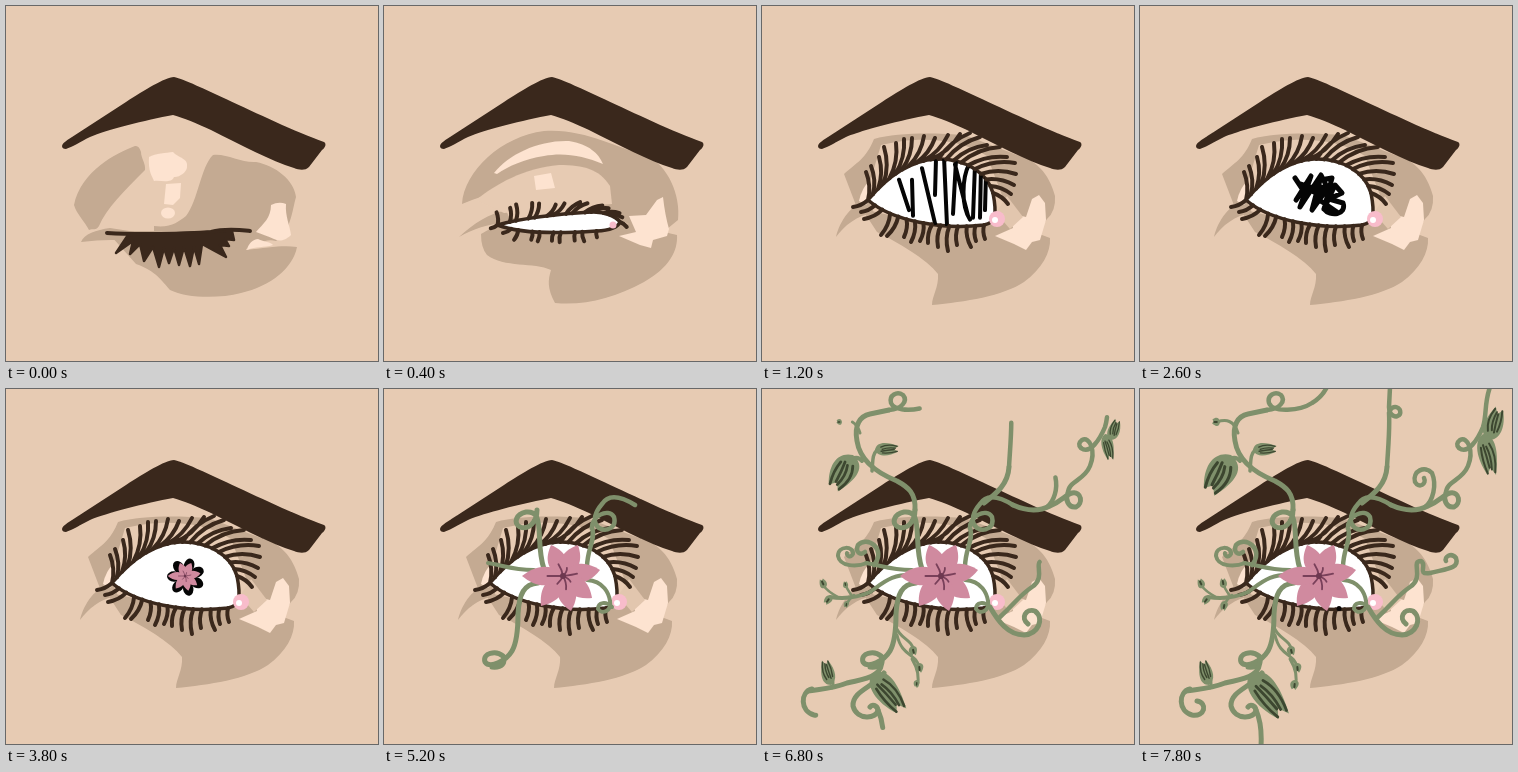
Recreate the animation shown at these times as an HTML page. Size 372x355 px, loop 8000 ms.

```html
<!DOCTYPE html>
<html lang="en">
<head>
<meta charset="utf-8">
<title>Blooming eye</title>
<style>
html, body { margin: 0; width: 100%; height: 100%; overflow: hidden; background: #e7cbb3; }
svg { display: block; width: 100%; height: 100%; }
.shade { fill: #c4aa92; }
.light { fill: #fde3d0; }
.skin { fill: #e7cbb3; }
.brown { fill: #3a281c; }
.line { fill: none; stroke: #3a281c; stroke-linecap: round; stroke-linejoin: round; }
.ink { fill: none; stroke: #050505; stroke-linecap: round; stroke-linejoin: round; }
.vine { fill: none; stroke: #7f906b; stroke-linecap: round; stroke-linejoin: round; }
</style>
</head>
<body>
<svg viewBox="0 0 372 355" id="stage">
  <defs><clipPath id="inside"><path id="clip"/></clipPath></defs>
  <rect class="skin" width="372" height="355"/>

  <g id="shutShade">
    <g class="shade">
      <path d="M129 140C110 147 75 165 68 199C70 207 79 216 83 224C87 222 90 225 93 220C100 203 118 185 139 164C140 158 135 152 135 146Q133 139 129 140Z"/>
      <path d="M75 236C78 228 90 224 104 222L130 226V236C110 233 95 234 75 236Z"/>
      <path d="M105 230L130 258C150 265 156 275 164 284C180 292 212 293 235 287C265 280 287 262 291 241C275 239 262 242 240 244V225H100Z"/>
      <path d="M207 149C220 147 235 157 250 156C270 160 288 174 290 191C286 205 285 225 270 235C258 232 250 240 240 243L148 230V220C165 222 172 216 180 210C192 195 195 160 207 149Z"/>
    </g>
    <g class="light">
      <path d="M143 151C150 147 160 147 167 146C172 152 182 152 181 160C182 166 172 172 168 171C165 178 155 174 148 175C146 170 142 165 143 151Z"/>
      <path d="M160 178L175 177L174 192L167 199L158 198Z"/>
      <ellipse cx="162" cy="207" rx="7" ry="5.5"/>
      <path d="M265 199Q273 195 280 198C279 210 284 220 285 229C278 236 272 235 268 233C262 230 255 228 250 226C257 218 265 212 265 199Z"/>
      <path d="M241 244C242 238 247 233 252 233C258 236 265 236 267 239C258 242 250 240 241 244Z"/>
    </g>
  </g>

  <g id="halfShade">
    <g class="shade">
      <path d="M78 198C80 165 118 130 160 125C200 122 232 142 262 149C284 159 297 190 294 214L272 232L225 208L215 190C170 176 125 178 78 198Z"/>
      <path d="M75 231C90 217 105 208 122 204L128 218C108 216 92 222 75 231Z"/>
      <path d="M97 228L125 212L232 215L293 229C294 245 285 262 260 276C230 292 200 300 171 297C163 282 164 274 167 264C150 256 120 262 103 249Q97 242 97 228Z"/>
    </g>
    <path class="skin" d="M92 194C112 178 140 162 175 159C200 159 215 163 226 180L228 198L120 207Z"/>
    <path class="light" d="M110 167C125 148 155 134 185 135C205 138 215 148 219 158C200 150 180 146 160 150C140 153 125 160 113 168Z"/>
    <path class="light" d="M150 170L167 167L171 182L152 184Z"/>
    <path class="light" d="M273 194L279 191Q281 209 285 223L283 230L269 234L267 242L256 239L235 230L252 226L245 210L262 209Z"/>
  </g>

  <g id="openShade">
    <g class="shade">
      <path d="M82 168C94 157 104 153 112 133C135 126 175 127 203 129L255 149C273 153 287 167 293 190Q294 205 285 213L272 232L246 205L225 150C195 130 150 131 119 139L107 179L95 202Z"/>
      <path d="M74 231C78 214 90 198 106 193L112 207C95 209 82 220 74 231Z"/>
      <path d="M100 203L115 226C135 236 165 253 176 268C177 281 170 290 170 299C203 296 241 290 262 276C280 263 289 246 288 232L280 229L232 212L150 214Z"/>
    </g>
    <path class="light" d="M97 195Q100 181 108 175L112 187L104 199Z"/>
    <path class="light" d="M270 193L277 189L283 197L284 214L278 234L270 236L264 244L252 238L233 230L251 222L247 207L264 211Z"/>
    <path d="M245 190L261 211L248 223L234 207Z" fill="#e2c6ae"/>
  </g>

  <path class="brown" d="M56 140C57 136 62 134 66 131L120 96C140 83 158 72 168 71C178 73 200 84 220 93C250 107 290 126 318 136C321 138 319 142 316 144L303 161C299 165 293 164 288 162C265 155 235 139 205 124C190 117 178 112 167 109C140 114 100 124 84 131C74 136 66 141 60 143Q56 143 56 140Z"/>

  <g id="shutLash">
    <path class="line" stroke-width="4" d="M101 227C130 229 180 228 205 226C220 222 235 224 244 225"/>
    <path class="line" style="fill:#3a281c" stroke-width="2.5" d="M122 229L110 247L127 235L124 248L134 238L138 255L147 241L153 261L158 242L163 257L168 242L173 259L178 241L184 260L188 241L193 258L196 238L207 244L220 251L214 239L223 240L219 233L228 234L226 225L205 226Z"/>
  </g>

  <g id="eye">
    <path id="white" class="line" style="fill:#fff" stroke-width="3.5"/>
    <g clip-path="url(#inside)">
      <path id="bars" class="ink" stroke-width="4" vector-effect="non-scaling-stroke"
        d="M137 198L147 214M150 198L151 217M160 192L173 221M174 187L173 206M182 186L185 222M194 188L191 216M193 190L206 217M207 190C200 197 199 212 208 219M213 190L211 218M219 191L218 218M224 195L223 214"/>
    </g>
    <path id="scrawl" class="ink" stroke-width="5"
      d="M155 172L163 184L156 194L171 170L160 201L181 169L187 181L166 182L182 190L172 204L180 174L192 172L184 203L195 179L202 187L189 193L203 197C207 209 190 211 184 203L197 206L178 193L186 186L160 178"/>
    <circle id="duct" fill="#f8bccb"/>
    <circle id="glint" cx="233" cy="214" r="3" fill="#fff"/>
    <path id="lashes" class="line" stroke-width="4"/>
  </g>

  <g id="vines"></g>
  <g id="petals"></g>
  <circle id="speck" cx="199" cy="219.500" r="2.500" fill="#080505"/>
</svg>
<script>
const STEP = 200, STEPS = 40;
const $ = id => document.getElementById(id);
const clamp = v => Math.max(0, Math.min(1, v));
const show = (el, on) => el.setAttribute('display', on ? 'inline' : 'none');
const set = (el, attrs) => { for (const n in attrs) el.setAttribute(n, attrs[n]); return el; };
const add = (parent, tag, attrs) =>
  parent.appendChild(set(document.createElementNS('http://www.w3.org/2000/svg', tag), attrs));

// Eyelid outlines: corner, upper lid (two curves), inner corner, lower lid
const SHUT = [106,228, 130,229, 180,229, 215,225, 225,224, 235,225, 240,225, 235,226, 225,227, 215,227, 180,229, 130,230, 106,228];
const HALF = [121,210, 140,197, 168,186, 200,187, 218,187, 229,196, 232,207, 232,218, 224,222, 210,223, 175,226, 140,225, 121,210];
const OPEN = [106,194, 120,177, 142,155, 174,153, 202,152, 225,166, 231,187, 235,208, 234,217, 222,219, 180,224, 130,215, 106,194];
const OPENING = [0, .25, .5, .75, 1, 1.5, 2];
const TOP_TIPS = [104,166, 109,160, 117,151, 122,141, 134,137, 142,133, 150,132, 162,130, 173,132, 186,129, 198,128,
  208,127, 218,131, 225,139, 238,141, 245,151, 253,157, 254,168, 252,179, 249,188, 246,198];
const LOW_TIPS = [91,201, 99,206, 102,213, 119,229, 125,230, 142,231, 149,236, 158,235, 166,237, 176,241, 186,245,
  195,239, 209,241, 214,235, 223,233];

const curve = (e, ...ids) => {
  const p = i => e[2 * i] + ' ' + e[2 * i + 1];
  return 'M' + p(ids[0]) + 'C' + ids.slice(1).map(p).join(' ');
};
const upper = e => curve(e, 0, 1, 2, 3, 4, 5, 6);
const lower = e => curve(e, 12, 11, 10, 9);
const ruler = document.createElementNS('http://www.w3.org/2000/svg', 'path');

function roots(d, n) {
  ruler.setAttribute('d', d);
  const len = ruler.getTotalLength();
  return Array.from({ length: n }, (_, i) => ruler.getPointAtLength(len * i / (n - 1)));
}

const rows = [[upper, TOP_TIPS, 1], [lower, LOW_TIPS, -1]].map(([lid, tips, bend]) => {
  const n = tips.length / 2;
  const dirs = roots(lid(OPEN), n).map((p, i) => [tips[2 * i] - p.x, tips[2 * i + 1] - p.y]);
  return { lid, dirs, n, bend };
});

function lashPath(e, size, sparse) {
  let d = '';
  for (const { lid, dirs, n, bend } of rows) {
    roots(lid(e), n).forEach((p, i) => {
      if (sparse && i % 3 === 1) return;
      const x = dirs[i][0] * size, y = dirs[i][1] * size;
      const c = (i < n / 2 ? -1 : 1) * bend * .16;
      d += `M${p.x} ${p.y}Q${p.x + x * .5 + y * c} ${p.y + y * .5 - x * c} ${p.x + x} ${p.y + y}`;
    });
  }
  return d;
}

// Vines: path, first step, last step, width, optional step at which it gives way
const VINES = [
  ['M160 180C155 165 156 150 155 140C154 128 152 122 142 123C132 125 129 134 136 138C144 141 153 134 153 121', 22, 26, 5],
  ['M203 178C203 160 212 150 208 139C207 128 224 118 230 128C233 139 222 143 215 139C207 132 212 122 218 115C225 104 238 108 251 116', 22, 26, 4.5],
  ['M150 181C128 181 118 176 104 174', 22, 26, 4],
  ['M154 194C140 195 135 205 134 225C134 245 132 255 128 262C122 272 106 280 101 273C98 264 112 261 119 267C122 274 118 279 108 278', 22, 26, 5],
  ['M203 191C220 192 225 205 226 212C228 222 218 226 214 220C214 213 222 212 228 218', 22, 26, 4],
  ['M153 121C154 104 146 98 135 92C115 84 98 72 95 52C92 36 98 27 108 25L127 21', 26, 30, 5],
  ['M127 21C140 20 146 12 141 6C135 2 127 6 129 14C133 24 160 22 172 14Q182 8 187 -2', 30, 36, 4.5],
  ['M251 116C262 121 276 123 288 117C300 112 303 106 310 104C320 102 321 115 314 118C306 119 303 110 306 104', 26, 29, 5],
  ['M306 104C306 92 322 92 328 77C334 62 328 47 320 51Q315 55 319 59', 28, 31, 4.5],
  ['M319 59C328 66 338 50 343 38C347 25 344 15 350 -2', 31, 36, 4.5],
  ['M222 114C235 104 246 95 247 78', 26, 29, 5],
  ['M247 78C246 70 248 57 240 56C230 55 227 66 235 71C241 73 245 68 247 62', 28, 31, 4, 33],
  ['M247 78C248 60 250 40 249 24C252 14 262 18 260 25C257 30 249 27 249 18L250 -2', 32, 37, 4.5],
  ['M285 118C293 112 297 96 292 84C285 76 272 82 275 93C279 100 287 95 284 89', 32, 37, 4.5],
  ['M105 174C95 178 78 178 76 167C76 156 92 157 91 165C88 170 84 166 85 164', 26, 31, 4],
  ['M112 176C125 160 105 146 96 156C93 163 98 167 103 163', 27, 31, 4.5],
  ['M155 186C130 184 122 193 108 203C95 209 82 210 68 208', 26, 31, 4],
  ['M90 207Q85 200 83 195M76 208Q66 203 61 196M92 206Q87 210 84 216', 30, 35, 2.5],
  ['M120 268C122 290 100 290 85 294C70 300 58 300 46 302', 26, 31, 5],
  ['M50 300C38 303 38 322 52 326C65 328 68 314 57 312', 31, 36, 5],
  ['M122 284C112 298 90 302 91 317C95 332 115 330 116 321C115 316 110 315 108 318', 27, 31, 5],
  ['M116 321C120 330 122 340 121 357', 32, 36, 5],
  ['M134 238C138 250 150 250 152 262', 27, 31, 3],
  ['M135 246C140 268 154 264 157 278M150 270Q159 285 155 297', 28, 36, 3],
  ['M228 218C236 232 246 246 262 246C276 245 283 230 273 222C264 219 258 229 266 235', 26, 31, 5],
  ['M238 228C255 212 258 206 270 198C285 188 270 172 281 172C288 176 276 186 290 184C305 180 320 180 316 169C311 163 304 168 306 172', 31, 37, 4.5],
  ['M98 44C94 31 86 30 77 33', 32, 36, 3],
  ['M110 82C111 72 110 66 115 61', 27, 30, 3.5],
  ['M100 72Q96 67 90 70', 26, 29, 4],
  ['M70 299Q73 292 68 287', 27, 30, 3]
];
// Leaves: base x, y, length, width, angle, first step, last step
const LEAVES = [
  [91, 66, 44, 28, 118, 26, 36], [113, 61, 24, 12, -5, 27, 34],
  [349, 51, 34, 18, -74, 32, 37], [343, 45, 43, 18, 76, 32, 37],
  [110, 284, 56, 26, 50, 27, 36], [69, 296, 26, 13, -106, 27, 34],
  [150, 257, 10, 8, 75, 28, 32], [157, 274, 10, 8, 85, 28, 34], [155, 291, 10, 8, 95, 32, 36],
  [63, 199, 10, 7, -115, 28, 33], [84, 199, 10, 7, -100, 32, 36],
  [69, 207, 10, 7, 125, 29, 34], [85, 212, 10, 7, 100, 32, 36], [80, 33, 8, 8, 180, 32, 36]
];

const vines = VINES.map(([d, from, to, w, end = STEPS]) => ({
  from, to, end,
  el: add($('vines'), 'path', { d, class: 'vine', 'stroke-width': w, pathLength: 1, 'stroke-dasharray': '1 2' })
}));
const leaves = LEAVES.map(([x, y, l, w, turn, from, to]) => {
  const el = add($('vines'), 'g', {});
  add(el, 'path', { fill: '#7f906b',
    d: `M0 0C${l * .1} ${-w * .7} ${l * .5} ${-w * .6} ${l} ${-w * .15}L${l * .8} ${w * .05}L${l * .95} ${w * .3}C${l * .5} ${w * .7} ${l * .1} ${w * .6} 0 0Z` });
  add(el, 'path', { fill: 'none', stroke: '#3d4730', 'stroke-width': l > 20 ? w * .11 : 2, 'stroke-linecap': 'round',
    d: l > 20
      ? `M${l * .25} ${-w * .2}Q${l * .55} ${-w * .45} ${l * .93} ${-w * .15}M${l * .3} 0Q${l * .55} ${-w * .15} ${l * .85} 0M${l * .25} ${w * .15}Q${l * .5} ${w * .1} ${l * .8} ${w * .1}M${l * .3} ${w * .3}Q${l * .6} ${w * .4} ${l * .92} ${w * .27}`
      : `M${l * .4} 0H${l * .7}` });
  return { el, x, y, turn, from, to };
});

// Flower around its own centre
const TIPS = [[-12, -31], [15, -31], [37, -6], [29, 22], [8, 35], [-22, 30], [-41, 0]];
const dark = add($('petals'), 'g', {});
const bloom = add($('petals'), 'g', {});
TIPS.forEach(([x, y], i) => {
  const turn = Math.atan2(y, x) * 180 / Math.PI, l = Math.hypot(x, y);
  add(dark, 'ellipse', { cx: 12, rx: 7, ry: 5.2, fill: '#050505', transform: `rotate(${i * 360 / 7 - 75})` });
  add(bloom, 'path', { fill: '#d08a9f', transform: `rotate(${turn})`,
    d: `M0 -4C${l * .4} -13 ${l * .7} -10 ${l} 0C${l * .7} 10 ${l * .4} 13 0 4Z` });
});
TIPS.forEach(([x, y], i) => {
  const s = i % 2 ? .26 : .38;
  add(bloom, 'path', { d: `M0 0Q${x * s * .6 + 2} ${y * s * .5} ${x * s} ${y * s}`, fill: 'none',
    stroke: '#79405a', 'stroke-width': 1.8, 'stroke-linecap': 'round' });
});
add(bloom, 'circle', { r: 3, fill: '#6d3850' });
const BLOOM = [0, .08, .18, .32, .42, .52, .75, .92, 1];

function render(k) {
  const o = OPENING[Math.min(k, 6)], wide = o > 1;
  const [a, b, t] = wide ? [HALF, OPEN, o - 1] : [SHUT, HALF, o];
  const e = a.map((v, i) => v + (b[i] - v) * t);
  const d = curve(e, 0, 1, 2, 3, 4, 5, 6, 7, 8, 9, 10, 11, 12) + 'Z';
  show($('shutShade'), k < 2);
  show($('halfShade'), k > 1 && k < 5);
  show($('openShade'), k > 4);
  show($('shutLash'), k < 1);
  show($('eye'), k > 0);
  $('white').setAttribute('d', d);
  $('clip').setAttribute('d', d);
  $('lashes').setAttribute('d', lashPath(e, wide ? .6 + .4 * t : .3 + .3 * t, o < 2));
  set($('duct'), { cx: wide ? 229 + 6 * t : 229, cy: wide ? 215 - 2 * t : 215 + 8 * (1 - t), r: wide ? 7 + t : 7 * t });
  show($('glint'), k > 5);

  // Bars stretch with the lids, then draw together into the pupil
  const pull = k < 10 ? 1 : 1 - .19 * (k - 9);
  const tall = (wide ? 1 + .9 * t : 1) * pull;
  show($('bars'), k > 2 && k < 13);
  $('bars').setAttribute('transform', `translate(180 ${wide ? 205 - 18 * t : 205}) scale(${pull} ${tall}) translate(-180 -205)`);
  show($('scrawl'), k > 12 && k < 17);
  $('scrawl').setAttribute('stroke-width', 5 + Math.max(0, k - 13) * .8);

  const size = BLOOM[Math.max(0, Math.min(8, k - 15))];
  show(dark, k > 16 && k < 22);
  dark.setAttribute('transform', 'translate(180 188)');
  show(bloom, size > 0);
  bloom.setAttribute('transform', `translate(179 187) scale(${size})`);

  for (const v of vines) {
    const p = clamp((k - v.from) / (v.to - v.from));
    show(v.el, p > 0 && k < v.end);
    v.el.setAttribute('stroke-dashoffset', 1 - p);
  }
  for (const f of leaves) {
    const p = clamp((k - f.from) / (f.to - f.from));
    show(f.el, p > 0);
    f.el.setAttribute('transform', `translate(${f.x} ${f.y}) rotate(${f.turn}) scale(${Math.sqrt(p)})`);
  }
  show($('speck'), k > 36);
}

let last = -1;
const start = performance.now();
function tick() {
  const k = Math.floor(Math.max(0, performance.now() - start) / STEP) % STEPS;
  if (k !== last) render(last = k);
  requestAnimationFrame(tick);
}
tick();
</script>
</body>
</html>
```
